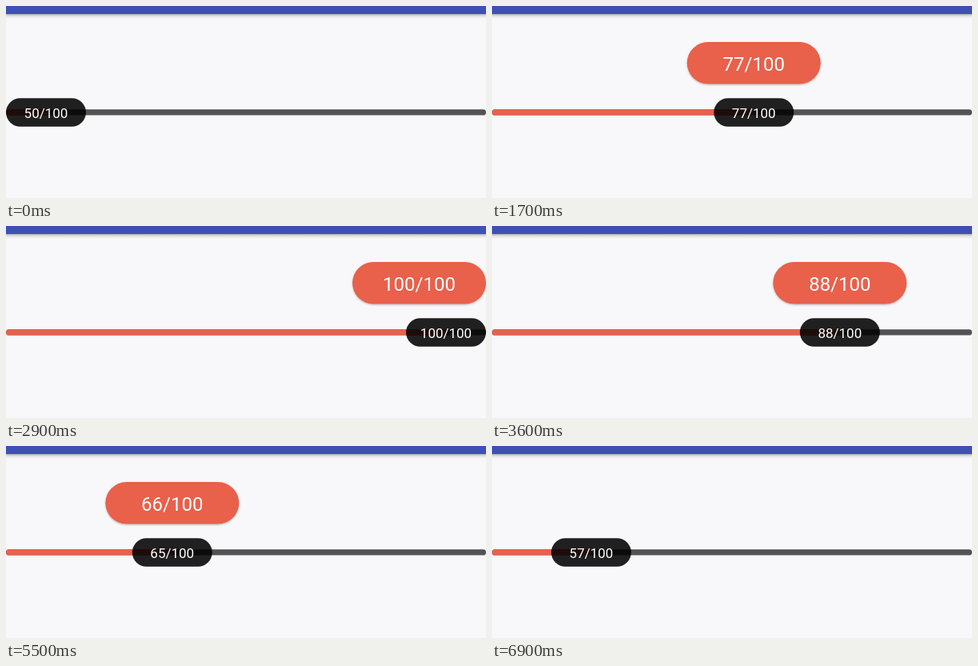
An HTML page that plays this animation: 600x240 px, repeating every 7.1 s.

```html
<!DOCTYPE html>
<html lang="en">
<head>
<meta charset="utf-8">
<title>Slider with value bubble</title>
<style>
  html, body { margin: 0; width: 100%; height: 100%; overflow: hidden; background: #f8f7f9; }
  svg { display: block; width: 600px; height: 240px; }
  text { font-family: Roboto, sans-serif; fill: #fff; text-anchor: middle; }
</style>
</head>
<body>
<svg viewBox="0 0 600 240">
  <defs>
    <linearGradient id="shade" x2="0" y2="1">
      <stop offset="0" stop-color="#000" stop-opacity=".3"/>
      <stop offset=".4" stop-color="#000" stop-opacity=".1"/>
      <stop offset="1" stop-color="#000" stop-opacity="0"/>
    </linearGradient>
    <filter id="lift" x="-10%" y="-20%" width="120%" height="150%">
      <feDropShadow dx="0" dy="1" stdDeviation=".8" flood-color="#000" flood-opacity=".28"/>
    </filter>
    <clipPath id="done"><rect id="fill" y="125" height="16"/></clipPath>
  </defs>
  <rect width="600" height="240" fill="#f8f7f9"/>
  <rect y="10" width="600" height="6" fill="url(#shade)"/>
  <rect width="600" height="10" fill="#3f50b5"/>

  <rect y="129.3" width="600" height="7.2" rx="3.6" fill="#535353"/>
  <rect y="129.3" width="600" height="7.2" rx="3.6" fill="#e9604c" clip-path="url(#done)"/>

  <g id="thumb">
    <rect y="115.2" width="100" height="35.6" rx="17.8" fill="#000" fill-opacity=".87"/>
    <text id="thumbText" x="50" y="139.8" font-size="17"></text>
  </g>
  <g id="bubble">
    <rect y="45" width="167" height="52.5" rx="26.25" fill="#e9604c" filter="url(#lift)"/>
    <text id="bubbleText" x="83.5" y="81" font-size="24"></text>
  </g>
</svg>
<script>
const LOOP = 7100, SPAN = 500, LAG = 16;
const el = id => document.getElementById(id);
const [fill, thumb, thumbText, bubble, bubbleText] =
  ['fill', 'thumb', 'thumbText', 'bubble', 'bubbleText'].map(el);

// Thumb position: [time, left edge]
const path = [
  [0, 0], [250, 0], [500, 22], [800, 75], [1000, 108], [1600, 248], [1700, 277],
  [2300, 422], [2700, SPAN], [3100, SPAN], [3400, 440], [4000, 280], [4300, 247],
  [5050, 247], [5200, 228], [5500, 158], [5800, 86], [6050, 74], [LOOP, 74]
];
// Bubble visibility: [shown from, fading from]
const touches = [[60, 4330], [5020, 6260]];
const FADE = 200;

const clamp = (v, lo, hi) => Math.min(hi, Math.max(lo, v));
const slope = i => (path[i + 1][1] - path[i][1]) / (path[i + 1][0] - path[i][0]);

// Tangent that never overshoots (harmonic mean of both slopes)
function tangent(i) {
  if (i === 0 || i === path.length - 1) return 0;
  const a = slope(i - 1), b = slope(i);
  return a * b > 0 ? 2 * a * b / (a + b) : 0;
}

function place(t) {
  t = clamp(t, 0, LOOP);
  let i = 0;
  while (i < path.length - 2 && t > path[i + 1][0]) i++;
  const [t0, x0] = path[i], [t1, x1] = path[i + 1];
  const d = t1 - t0, u = (t - t0) / d, v = 1 - u;
  return x0 * v * v * (1 + 2 * u) + x1 * u * u * (3 - 2 * u)
    + d * u * v * (v * tangent(i) - u * tangent(i + 1));
}

const label = x => Math.floor(50 + x / 10 + 1e-6) + '/100';
const shown = t => Math.max(...touches.map(([a, b]) =>
  Math.min(clamp((t - a) / FADE, 0, 1), clamp(1 - (t - b) / FADE, 0, 1))));
const move = (node, x) => node.setAttribute('transform', `translate(${x.toFixed(2)} 0)`);

function draw(t) {
  const x = place(t);
  fill.setAttribute('width', x + 50);
  move(thumb, x);
  thumbText.textContent = label(x);
  move(bubble, clamp(x - 33.5, 0, 433));
  bubble.setAttribute('opacity', shown(t));
  bubbleText.textContent = label(place(t - LAG));
}

const start = performance.now();
function tick() {
  draw((performance.now() - start) % LOOP);
  requestAnimationFrame(tick);
}
tick();
</script>
</body>
</html>
```
